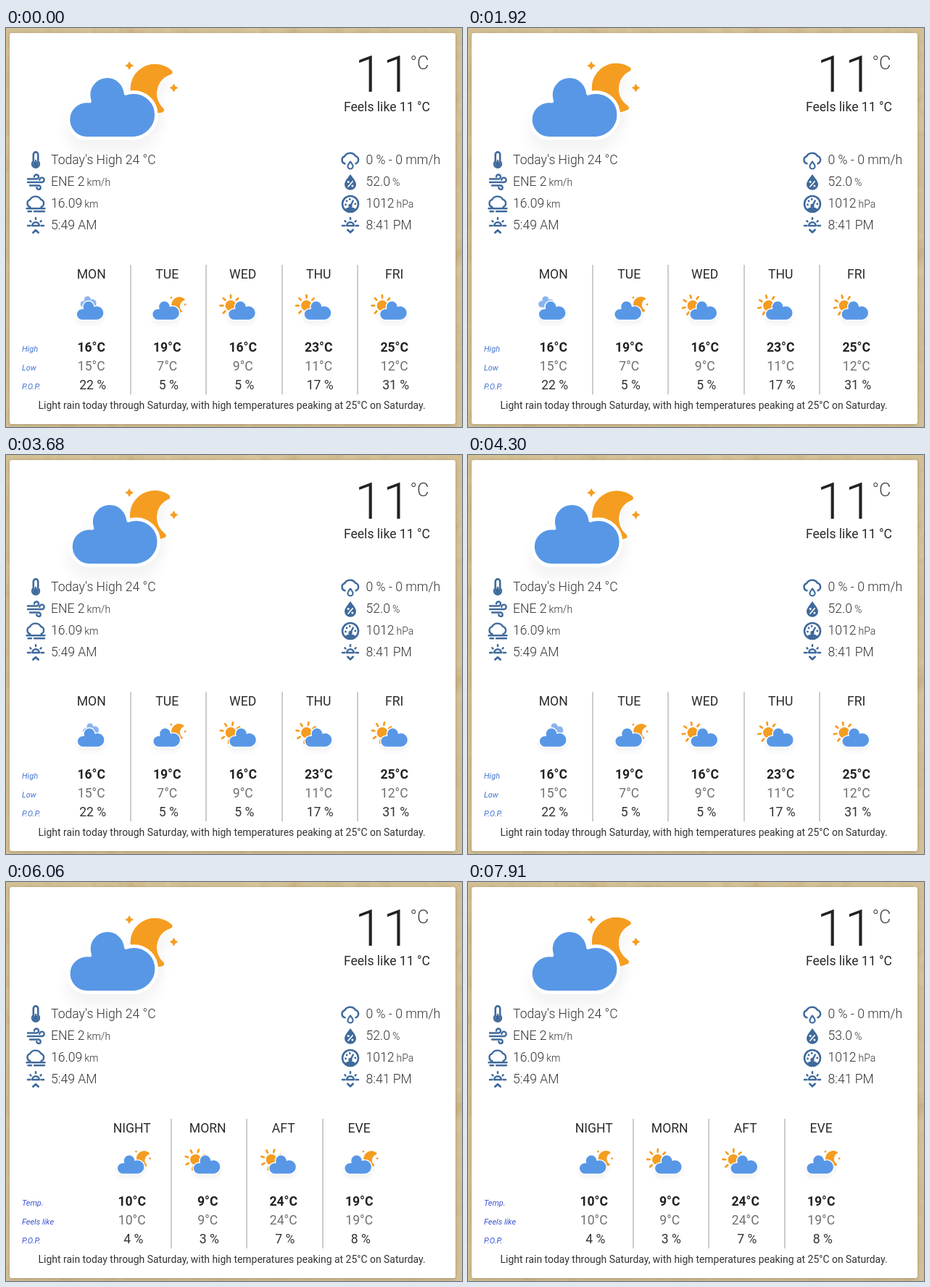
An HTML page with a canvas for the animation above (7990 ms loop, 629 by 551 pixels).

```html
<!DOCTYPE html>
<html lang="en">
<head>
<meta charset="utf-8">
<title>Weather</title>
<style>
html, body { margin: 0; width: 100%; height: 100%; overflow: hidden; background: #d3bf94; }
canvas { display: block; }
</style>
</head>
<body>
<canvas id="stage" width="629" height="551"></canvas>
<script>
const W = 629, H = 551, LOOP = 7990;
const SWITCH_AT = 4680, HUMIDITY_AT = 7760;
// How long each kind of icon has already been running at the loop start
const LEAD = { night: 33500, cloudy: 33500, day: 33750 };
const BLUE = '#5897e6', PALE = '#8ab3ee', ORANGE = '#f59d20', STEEL = '#3f6a9c';
const BODY = 17.6;
const stage = document.getElementById('stage').getContext('2d');
let ctx = stage;

const cloudPath = new Path2D('M47.7 35.4c0-4.6-3.7-8.2-8.2-8.2c-1 0-1.9.2-2.8.5c-.3-3.4-3.1-6.2-6.6-6.2c-3.7 0-6.7 3-6.7 6.7c0 .8.2 1.6.4 2.3c-.3-.1-.7-.1-1-.1c-3.7 0-6.7 3-6.7 6.7c0 3.6 2.9 6.6 6.5 6.7l17.2 0C44.2 43.3 47.7 39.8 47.7 35.4z');
const moonPath = new Path2D('M14.5 13.2c0-3.7 2-6.9 5-8.7c-1.5-.9-3.2-1.3-5-1.3c-5.5 0-10 4.5-10 10s4.5 10 10 10c1.8 0 3.5-.5 5-1.3C16.5 20.2 14.5 16.9 14.5 13.2z');
const starPath = new Path2D('M3.3 1.5L4 2.7L5.2 3.3L4 4L3.3 5.2L2.7 4L1.5 3.3L2.7 2.7Z');

const daily = {
  first: 118, labels: ['High', 'Low', 'P.O.P.'], ink: '#4575cf',
  days: [
    ['MON', 'cloudy', '16°C', '15°C', '22 %'],
    ['TUE', 'night', '19°C', '7°C', '5 %'],
    ['WED', 'day', '16°C', '9°C', '5 %'],
    ['THU', 'day', '23°C', '11°C', '17 %'],
    ['FRI', 'day', '25°C', '12°C', '31 %']
  ]
};
const parts = {
  first: 174, labels: ['Temp.', 'Feels like', 'P.O.P.'], ink: '#3c53d6',
  days: [
    ['NIGHT', 'night', '10°C', '10°C', '4 %'],
    ['MORN', 'day', '9°C', '9°C', '3 %'],
    ['AFT', 'day', '24°C', '24°C', '7 %'],
    ['EVE', 'night', '19°C', '19°C', '8 %']
  ]
};

// 0 -> 1 -> 0, linear
function swing(time, period) {
  const p = (time % period) / period;
  return p < 0.5 ? p * 2 : 2 - p * 2;
}

function at(x, y, draw, scale = 1) {
  ctx.save();
  ctx.translate(x, y);
  ctx.scale(scale, scale);
  draw();
  ctx.restore();
}

function text(str, x, y, size, weight, color, align = 'left', style = '') {
  ctx.font = `${style} ${weight} ${size}px Roboto, sans-serif`;
  ctx.fillStyle = color;
  ctx.textAlign = align;
  ctx.fillText(str, x, y);
}

function stroke(d, width, color = STEEL) {
  ctx.strokeStyle = color;
  ctx.lineWidth = width;
  ctx.lineCap = ctx.lineJoin = 'round';
  ctx.stroke(new Path2D(d));
}

function fill(d, color = STEEL) {
  ctx.fillStyle = color;
  ctx.fill(new Path2D(d));
}

function dot(x, y, r, color = STEEL) {
  ctx.fillStyle = color;
  ctx.beginPath();
  ctx.arc(x, y, r, 0, Math.PI * 2);
  ctx.fill();
}

// Weather icons, on a 64-unit grid

function cloud(x, y, scale, color) {
  at(x, y, () => {
    ctx.fillStyle = color;
    ctx.strokeStyle = '#fff';
    ctx.lineWidth = 1.2;
    ctx.lineJoin = 'round';
    ctx.fill(cloudPath);
    ctx.stroke(cloudPath);
  }, scale);
}

function moon(time) {
  at(36, 14, () => {
    ctx.fillStyle = ctx.strokeStyle = ORANGE;
    ctx.fill(starPath);
    at(20, 10, () => ctx.fill(starPath));
    ctx.translate(12.5, 15.15);
    ctx.rotate(swing(time, 6000) * 15 * Math.PI / 180);
    ctx.translate(-12.5, -15.15);
    ctx.lineWidth = 2;
    ctx.lineJoin = 'round';
    ctx.fill(moonPath);
    ctx.stroke(moonPath);
  }, 0.8);
}

function sun(time) {
  at(20, 26, () => {
    ctx.rotate(time / 9000 * Math.PI * 2);
    dot(0, 0, 6, ORANGE);
    for (let i = 0; i < 8; i++) {
      stroke('M0 9V12', 2, ORANGE);
      ctx.rotate(Math.PI / 4);
    }
  });
}

function weather(kind, x, y, scale, loopTime) {
  const time = loopTime + LEAD[kind];
  const paint = () => {
    if (kind === 'night') moon(time);
    else if (kind === 'day') sun(time);
    else cloud(5 + swing(time, 7000) * 15, 2, 0.6, PALE);
    cloud(swing(time, 3000) * 2, -1, 1, BLUE);
  };
  at(x, y, () => {
    ctx.shadowColor = 'rgba(0,0,0,.05)';
    ctx.shadowBlur = 6 * scale;
    ctx.shadowOffsetY = 4 * scale;
    paint();
    ctx.shadowColor = 'transparent';
    paint();
  }, scale);
}

// Detail symbols, centred on their origin

const lineCloud = 'M-7.5 4.2a5.2 5.2 0 0 1-.4-10a8.2 7.4 0 0 1 15-.3a5.4 5.4 0 0 1 .4 10.3';

const symbols = {
  thermometer() {
    stroke('M-3.2 1V-8.4a3.2 3.2 0 0 1 6.4 0V1a4.9 4.9 0 1 1-6.4 0Z', 2.6);
    stroke('M0 0V4', 2.4);
    dot(0, 4.8, 3.6);
  },
  wind() {
    stroke('M-11 -4.5H1a3 3 0 1 0-3-3M-11 0H8.5a3.2 3.2 0 1 0-3.2-3.2M-8 4.5H4a2.7 2.7 0 1 1-2.7 2.7', 2.4);
  },
  fog() {
    stroke(lineCloud + 'M-12.5 6.3H12.5M-10.5 10.3H-6M-2 10.3H12', 2.4);
  },
  horizon() {
    stroke('M-11 1H-7.5M7.5 1H11M-4.8 1a4.8 4.8 0 0 1 9.6 0ZM0 -9.8V-8M-7.6 -5.6l1 1M7.6 -5.6l-1 1', 2.5);
  },
  sunrise() {
    symbols.horizon();
    stroke('M-3.6 10.6L0 7.2L3.6 10.6', 2.8);
  },
  sunset() {
    symbols.horizon();
    stroke('M-3.6 6.8L0 10.2L3.6 6.8', 2.8);
  },
  rain() {
    stroke(lineCloud, 2.5);
    fill('M0 -2C3 1.5 6 4 6 7.5a6 6 0 0 1-12 0C-6 4-3 1.5 0 -2Z', '#fff');
    stroke('M0 1.5c2 2.6 3.6 4.4 3.6 6.5a3.6 3.5 0 0 1-7.2 0C-3.6 5.9-2 4.1 0 1.5Z', 2.1);
  },
  drop() {
    fill('M0 -11C4 -5.5 8 -1 8 3.2a8 7.5 0 0 1-16 0C-8 -1-4 -5.5 0 -11Z');
    stroke('M-3 6L3.2 -1.2', 1.7, '#fff');
    dot(-2.8, -.4, 1.5, '#fff');
    dot(2.9, 5, 1.5, '#fff');
  },
  gauge() {
    stroke('M-11 0a11 11 0 1 1 22 0a11 11 0 1 1-22 0', 2.6);
    fill('M-7.8 7.2Q0 1.5 7.8 7.2Q0 14 -7.8 7.2Z');
    stroke('M0 3L3.8 -4.5', 2.4);
    dot(0, 2.4, 2.6);
    [[-6.5, 1], [-5, -4], [-.8, -6.5], [6.8, 0]].forEach(([x, y]) => dot(x, y, 1.4));
  }
};

function detail(symbol, x, y, value, unit) {
  at(x, y, symbols[symbol]);
  const left = x === 41 ? 62 : 496.5, base = Math.round((y - 182.5) / 30) * 30 + 188;
  text(value, left, base, BODY, 300, '#333');
  if (unit) text(unit, left + ctx.measureText(value).width + 3, base, 14, 300, '#333');
}

function details(time) {
  detail('thermometer', 41, 183, "Today's High 24 °C");
  detail('wind', 41, 213, 'ENE 2', 'km/h');
  detail('fog', 41, 243, '16.09', 'km');
  detail('sunrise', 41, 272, '5:49 AM');
  detail('rain', 475, 183, '0 % - 0 mm/h');
  detail('drop', 475, 213, time < HUMIDITY_AT ? '52.0' : '53.0', '%');
  detail('gauge', 475, 243, '1012', 'hPa');
  detail('sunset', 475, 272, '8:41 PM');
}

function forecast(set, time) {
  set.labels.forEach((s, i) => text(s, 22, 447 + i * 26, 11, 400, set.ink, 'left', 'italic'));
  set.days.forEach(([name, kind, high, low, rain], i) => {
    const x = set.first + i * 104.5;
    if (i) {
      ctx.fillStyle = '#ccc';
      ctx.fillRect(Math.floor(x - 51.5), 327, 2, 179);
    }
    text(name, x - 0.3, 346, BODY, 400, '#2a2a2a', 'center');
    weather(kind, x - 41, 352.2, 1.2, time);
    text(high, x - 0.3, 447, BODY, 700, '#222', 'center');
    text(low, x - 0.3, 473, BODY, 400, '#707070', 'center');
    text(rain, x + 1.7, 499, BODY, 400, '#333', 'center');
  });
}

// Parchment and card, painted once
function makeBackdrop() {
  const layer = document.createElement('canvas');
  layer.width = W;
  layer.height = H;
  ctx = layer.getContext('2d');
  let seed = 7;
  const rnd = () => (seed = seed * 16807 % 2147483647) / 2147483647;
  ctx.fillStyle = '#d3bf94';
  ctx.fillRect(0, 0, W, H);
  for (let i = 0; i < 2600; i++) {
    ctx.globalAlpha = 0.04 + rnd() * 0.1;
    dot(rnd() * W, rnd() * H, 2 + rnd() * 9, rnd() < 0.5 ? '#bda271' : '#e8dab6');
  }
  ctx.globalAlpha = 1;
  ctx.shadowColor = 'rgba(60,45,15,.3)';
  ctx.shadowBlur = 4;
  ctx.shadowOffsetY = 1;
  ctx.fillStyle = '#fff';
  ctx.beginPath();
  ctx.roundRect(5, 7, 615, 540, 3);
  ctx.fill();
  ctx.shadowColor = 'transparent';
  ctx = stage;
  return layer;
}

const backdrop = makeBackdrop();

function draw(time) {
  ctx.drawImage(backdrop, 0, 0);
  weather('night', 21.6, -12, 3.84, time);
  text('11', 481, 88, 70, 300, '#222');
  text('°C', 557.5, 57, 25.2, 300, '#444');
  text('Feels like 11 °C', 585, 115, BODY, 400, '#2a2a2a', 'right');
  details(time);
  forecast(time < SWITCH_AT ? daily : parts, time);
  text('Light rain today through Saturday, with high temperatures peaking at 25°C on Saturday.', 311.6, 526, 13.95, 400, '#333', 'center');
}

const start = performance.now();
function tick() {
  draw((performance.now() - start) % LOOP);
  requestAnimationFrame(tick);
}
tick();
</script>
</body>
</html>
```
